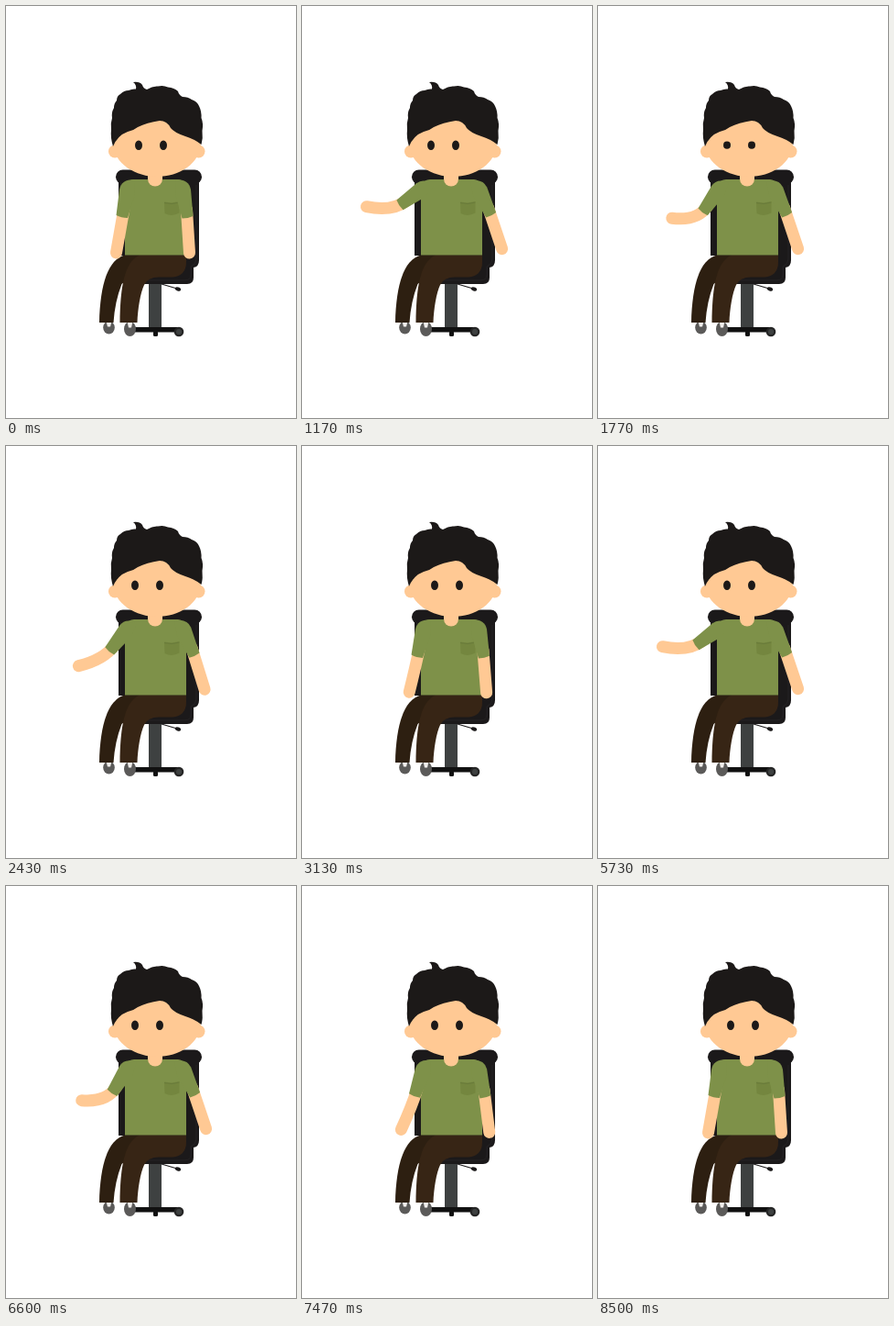
Write an HTML page that moves like this. It is 317x449 px and loops after 9110 ms.

```html
<!DOCTYPE html>
<html lang="en">
<head>
<meta charset="utf-8">
<title>Seated man gesturing</title>
<style>
  html, body { margin: 0; width: 100%; height: 100%; overflow: hidden; background: #fff; }
  svg { display: block; width: 100vw; height: 100vh; }
  .skin { fill: #ffc994; }
  .shirt { fill: #7e9149; }
  .hair { fill: #1c1918; }
  .limb { fill: none; stroke: #ffc994; stroke-width: 13; stroke-linecap: round; }
</style>
</head>
<body>
<svg viewBox="0 0 317 449">
  <g id="chair" fill="#1b191a">
    <rect x="156" y="298" width="14" height="53" fill="#3e4141"/>
    <path d="M170 303L187 308" stroke="#1b191a" stroke-width="1.3"/>
    <ellipse cx="188" cy="308.5" rx="3.2" ry="2" transform="rotate(17 188 308.5)"/>
    <rect x="136" y="350" width="53" height="5.500" rx="2" fill="#111"/>
    <rect x="161" y="354" width="5" height="6" rx="1.5" fill="#111"/>
    <circle cx="189" cy="355" r="5.300" fill="#252525"/>
    <circle cx="189" cy="355" r="3" fill="#3e4141"/>
    <rect x="120" y="178.500" width="94" height="15.500" rx="7.7"/>
    <path d="M123 186H211V277Q211 284 205 285V296Q205 303 198 303H146V272H123Z"/>
    <path d="M208 195V276Q208 281 202 284V293Q202 299 195 299H152" fill="none" stroke="#252324"/>
  </g>

  <g id="legs">
    <g fill="#5b5a59">
      <ellipse cx="112.500" cy="350.500" rx="6.300" ry="7"/>
      <ellipse cx="135.500" cy="352" rx="6.500" ry="8"/>
    </g>
    <path d="M109.500 344H115.500L114 349.500H111ZM132.500 344H138.500L137 350.500H134Z" fill="#f1eeec"/>
    <path d="M130 271.500C112 276 103 302 102 345H117.500Q119 322 126.500 303L165 271.500Z" fill="#2d1f11"/>
    <path d="M146 271.500C129 279 125 307 124.500 345H143.500C144 330 147 312 151 304Q155 295.500 167 295.500H182Q197 294 197 279V271.500Z" fill="#372515"/>
  </g>

  <path class="shirt" d="M130 271.500V205Q127 190 140 189H188Q199 190 197 205V271.500Z"/>
  <path d="M173 213.500L181 214.500L189.500 213V225.500Q181 230 173.500 226Z" fill="#74863f"/>
  <path d="M173 214.500L181 215.500L189.500 214" fill="none" stroke="#697b3a"/>

  <path id="forearm" class="limb"/>
  <path id="sleeve" class="shirt" d="M140 189Q126 189 124 200L120.500 228Q126 231 133 231L141 205Z"/>
  <g id="rightArm">
    <path class="limb" d="M197.500 222L200.500 269"/>
    <path class="shirt" d="M186 189Q200 189 202 200L204.500 229Q199 231.500 192.500 231.500L185 205Z"/>
  </g>

  <g id="head">
    <path class="skin" d="M155 182H171V188.500A8 8 0 0 1 155 188.500Z"/>
    <circle class="skin" cx="119" cy="158.500" r="7"/>
    <circle class="skin" cx="210.500" cy="158.500" r="7"/>
    <path class="skin" d="M117 148C117 173 143 186 165 186C189 186 213 172 213 148L190 115H135Z"/>
    <path class="hair" d="M117 153Q114 143 115 135Q114 128 116 122Q115 116 118 111Q118 106 121 103Q121 98 125 96Q129 92 134 92Q138 90 142 90.500Q143 86 139 83Q146 82 149 86Q150 90 154 91Q160 87 166 87.500Q172 86 177 88.500Q184 89 188 93Q189 97 193 99Q199 99 203 102Q209 104 211 109Q214 115 213.500 122Q216 128 214.500 136Q215.500 144 213.500 151Q206 145 196 142Q184 138 180 133Q176 125 168 125Q154 127 144 132Q139 136 133 137Q122 141 117 153Z"/>
    <g id="eyes" class="hair">
      <ellipse cx="145" cy="0" rx="4" ry="5.300"/>
      <ellipse cx="172" cy="0" rx="4" ry="5.300"/>
    </g>
  </g>
</svg>
<script>
const HALF = 4570, LOOP = 9110, RAD = Math.PI / 180;
const SHOULDER = { x: 133, y: 198 }, UPPER = 44, FORE = 28;
const el = id => document.getElementById(id);
const [forearm, sleeve, rightArm, eyes] = ["forearm", "sleeve", "rightArm", "eyes"].map(el);

const smooth = p => p * p * (3 - 2 * p);
const settle = p => smooth(1 - (1 - p) ** 2);

// Keys are [time, value, easing towards this key].
function track(keys, t) {
  let [t0, v0] = keys[0];
  for (const [t1, v1, ease = smooth] of keys) {
    if (t < t1) return t <= t0 ? v0 : v0 + (v1 - v0) * ease((t - t0) / (t1 - t0));
    [t0, v0] = [t1, v1];
  }
  return v0;
}

const upperKeys = [[500, 10], [1150, 53], [1980, 30], [2310, 39], [3660, 10, settle]];
const foreKeys = [[500, 10], [1170, 102], [2200, 94], [3660, 10, settle]];
const rightKeys = [[500, 0], [1170, -15], [2300, -15], [3660, 0, settle]];
const gazeKeys = [[500, 0], [850, -4], [2450, -4], [2850, 0]];
const blinkKeys = [[1750, 1], [1815, 0.1], [1880, 1], [3790, 1], [3860, 0.1], [3930, 1]];

// Angles are measured from straight down, towards the left.
const along = (p, angle, length) => ({
  x: p.x - length * Math.sin(angle * RAD),
  y: p.y + length * Math.cos(angle * RAD)
});

function draw(t) {
  const upper = track(upperKeys, t);
  const start = along(SHOULDER, upper, 24);
  const elbow = along(SHOULDER, upper, UPPER);
  const hand = along(elbow, track(foreKeys, t), FORE);
  forearm.setAttribute("d", `M${start.x} ${start.y}Q${elbow.x} ${elbow.y} ${hand.x} ${hand.y}`);
  sleeve.setAttribute("transform", `rotate(${upper - 10} ${SHOULDER.x} ${SHOULDER.y})`);
  rightArm.setAttribute("transform", `rotate(${track(rightKeys, t)} 193 198)`);
  eyes.setAttribute("transform", `translate(${track(gazeKeys, t)} 151.7) scale(1 ${track(blinkKeys, t)})`);
}

const begin = performance.now();
function frame() {
  draw((performance.now() - begin) % LOOP % HALF);
  requestAnimationFrame(frame);
}
frame();
</script>
</body>
</html>
```
